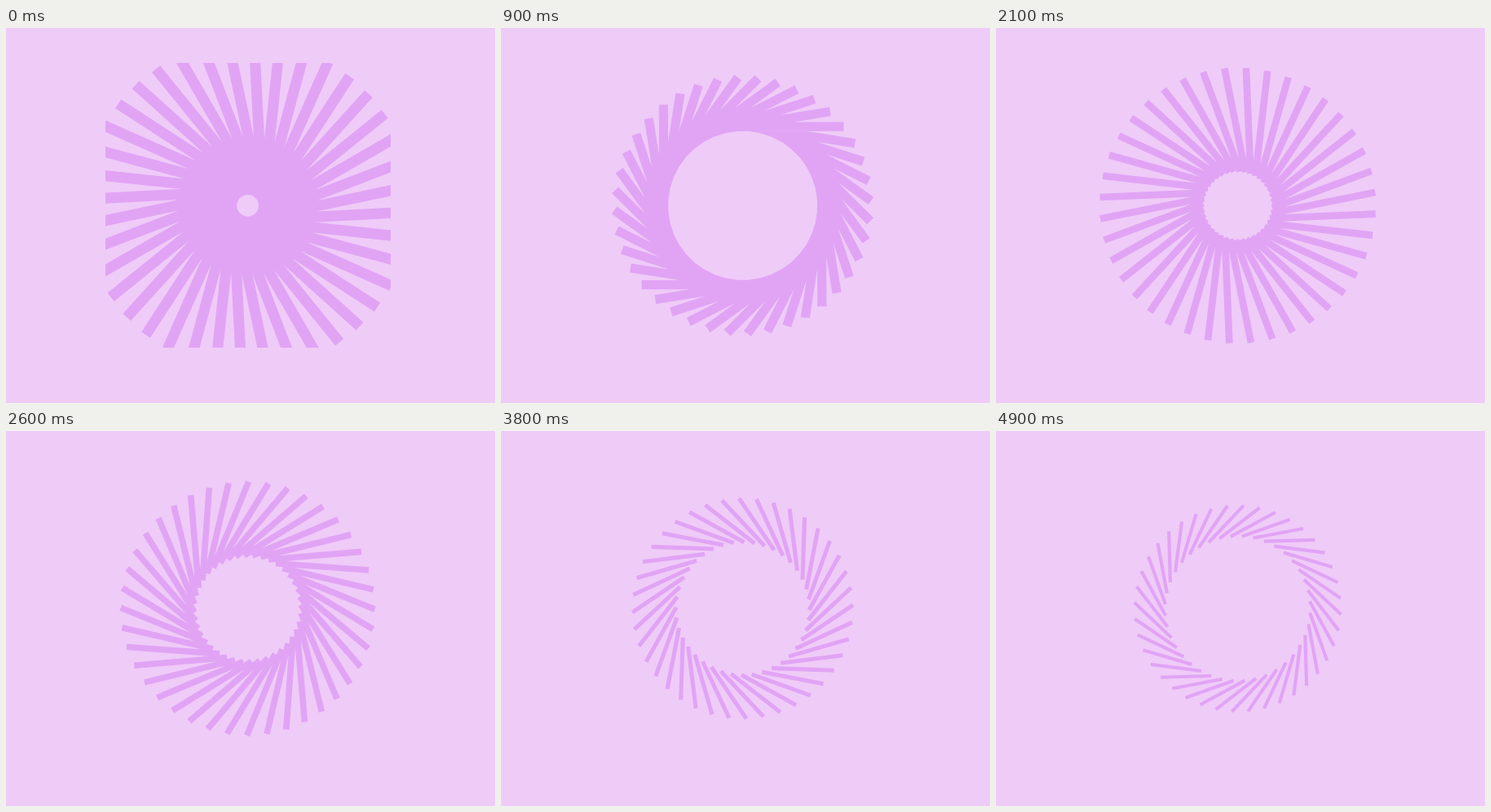
An HTML page for the animation above (5000 ms loop, 600 by 461 pixels).

```html
<!DOCTYPE html>
<html lang="en">
<head>
<meta charset="utf-8">
<title>Spinning bars</title>
<style>
  html, body { margin: 0; width: 100%; height: 100%; overflow: hidden; background: #efcbf7; }
  svg { display: block; width: 100vw; height: 100vh; }
</style>
</head>
<body>
<svg viewBox="0 0 600 461">
  <clipPath id="frame"><rect x="122" y="43" width="350" height="350"/></clipPath>
  <g clip-path="url(#frame)">
    <path id="bars" fill="none" stroke="#e1a4f5"/>
  </g>
</svg>
<script>
const LOOP = 5000, STEP = 100;
const COUNT = 40, CX = 296.6, CY = 218.3, RADIUS = 105;
const START_TICK = 59.35, TICKS_PER_SECOND = 30;
const ORBIT = 0.01, SPIN = 0.05; // radians per tick
const MIN_LENGTH = 52.3, GROWTH = 31.4, TURN = 4.576;
const bars = document.getElementById('bars');

function draw(ms) {
  // the picture advances in steps of a tenth of a second
  const t = Math.floor((ms % LOOP) / STEP) * STEP / 1000;
  const tick = START_TICK + TICKS_PER_SECOND * t;
  const length = MIN_LENGTH + GROWTH * Math.abs(t - TURN);
  let d = '';
  for (let i = 0; i < COUNT; i++) {
    const place = i * 2 * Math.PI / COUNT + tick * ORBIT;
    const angle = place + tick * SPIN;
    const x = CX + RADIUS * Math.sin(place);
    const y = CY - RADIUS * Math.cos(place);
    const dx = length / 2 * Math.sin(angle);
    const dy = -length / 2 * Math.cos(angle);
    d += `M${(x - dx).toFixed(2)} ${(y - dy).toFixed(2)}L${(x + dx).toFixed(2)} ${(y + dy).toFixed(2)}`;
  }
  bars.setAttribute('d', d);
  bars.setAttribute('stroke-width', (length / 15).toFixed(2));
}

let start;
function tickFrame(now) {
  if (start === undefined) start = now;
  draw(now - start);
  requestAnimationFrame(tickFrame);
}
draw(0);
requestAnimationFrame(tickFrame);
</script>
</body>
</html>
```
